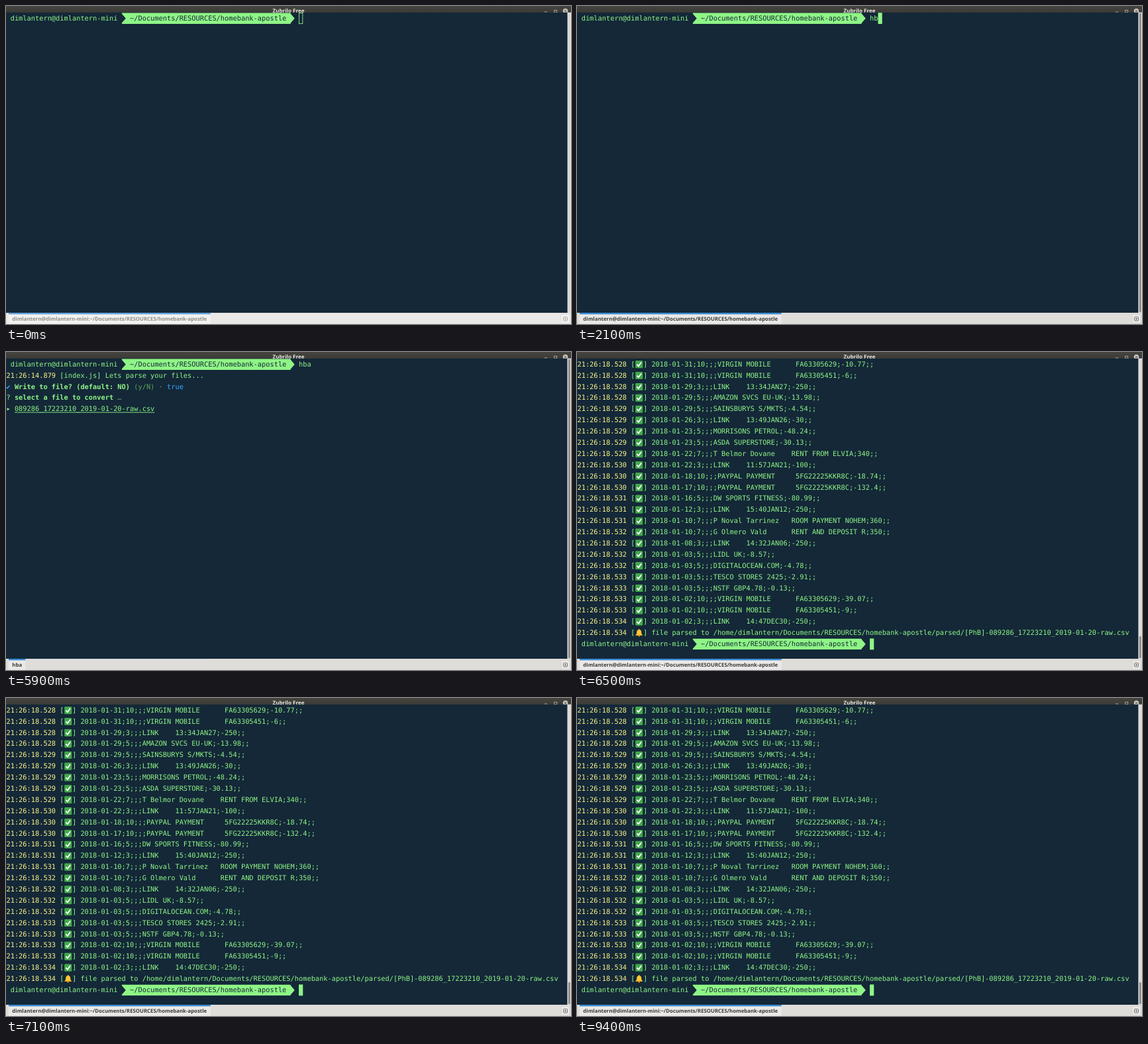
An HTML page that plays this animation: 853x480 px, repeating every 9500 ms.

```html
<!DOCTYPE html>
<html lang="en">
<head>
<meta charset="utf-8">
<title>Terminal session</title>
<style>
html, body { margin: 0; width: 100%; height: 100%; overflow: hidden; background: #142838; }
#stage {
  position: absolute; left: 0; top: 0; width: 1920px; height: 1080px; overflow: hidden;
  transform: scale(.44427, .444445); transform-origin: 0 0;
  text-rendering: geometricPrecision;
}
#stage div { position: absolute; box-sizing: border-box; }

.title {
  left: 0; top: 0; width: 1920px; height: 40px;
  background: linear-gradient(#45443f, #3b3a36 24px);
  font: bold 18px/24px "Open Sans", "Noto Sans", sans-serif; color: #efece6; text-align: center;
}
.title span { position: absolute; left: 0; right: 0; top: 5px; }
.title svg { position: absolute; left: 1820px; top: 0; }

.term { left: 0; top: 22px; width: 1908px; height: 1020px; background: #142838; overflow: hidden; }
.screen { left: 1px; top: 1px; width: 1906px; height: 1018px; visibility: hidden; }
#stage .row {
  position: relative; height: 38px; line-height: 38px; white-space: pre; color: #8ff586;
  font-family: "DejaVu Sans Mono", "Liberation Mono", monospace; font-size: 23.25px;
}
.time { color: #fff688; }
.dim { color: #5fa359; }
.blue { color: #3ba5ff; }
.path { color: #142838; }
b { font-weight: bold; }
u { text-decoration-thickness: 2px; text-underline-offset: 3px; }
.cell { display: inline-block; width: 14px; }
.icon { display: inline-block; width: 28px; height: 38px; vertical-align: top; }
.ribbon { position: absolute; left: 392px; top: 0; }
.cursor { width: 14px; height: 38px; background: #8ff586; }
.cursor.hollow { background: none; border: 2px solid #8ff586; }

.chrome { left: 0; top: 0; width: 1920px; height: 1080px; }
.bar { left: 0; top: 1042px; width: 1920px; height: 38px; background: #ebe9e7; }
.tab {
  left: 9px; top: 0; height: 38px; padding: 8px 12px 0; border-top: 5px solid #5ba0dd;
  background: #f3f2f1; color: #8d8c8a; white-space: pre;
  font: bold 17.6px/24px "Open Sans", "Noto Sans", sans-serif;
}
.tab span { position: relative; top: -5px; }
.more { left: 1886px; top: 5px; width: 30px; height: 31px; border: 1px solid #d2d0cd; border-radius: 4px; background: #f3f2f1; color: #979593; }
.more svg { position: absolute; left: 6px; top: 6px; }
.rail { left: 1908px; top: 22px; width: 12px; height: 1020px; background: #ecebe9; }
.thumb { left: 3px; top: 2px; width: 6px; height: 1016px; border-radius: 3px; background: #d3d1cf; }
.front .bar { background: #dfddda; }
.front .tab { border-top-color: #2f86d6; background: #ebe9e7; color: #3a3a38; }
.front .more { background: #eceae8; border-color: #bfbdb9; color: #4d4c49; }
.front .rail { background: #dedcd9; }
.front .thumb { background: #8b8987; }
</style>
</head>
<body>
<div id="stage">
  <div class="title">
    <span>Zubrilo Free</span>
    <svg width="100" height="40" fill="none" stroke="#bdbab2" stroke-width="2">
      <path d="M10 20h9M43 14h9v8h-9z"/>
      <circle cx="81" cy="17" r="8.5" fill="#c9c6bf" stroke="none"/>
      <path d="M77.500 13.500l7 7m0-7l-7 7" stroke="#3b3a36"/>
    </svg>
  </div>
  <div class="term" id="term"></div>
</div>
<script>
const LOOP = 9500;
const USER = 'dimlantern', HOST = USER + '-mini';
const DIR = '~/Documents/RESOURCES/homebank-apostle';
const FILE = '089286_17223210_2019-01-20-raw.csv';
const LONG_TAB = `${USER}@${HOST}:${DIR}`;

const stage = document.getElementById('stage');
const term = document.getElementById('term');

const span = (cls, text) => `<span class="${cls}">${text}</span>`;
const cell = (ch, cls = '') => span('cell ' + cls, ch);
const icon = shapes => `<svg class="icon" viewBox="0 0 28 38">${shapes}</svg>`;

const CHECK = icon('<rect x="1.500" y="6.500" width="25" height="25" rx="3" fill="#43a94c"/>' +
  '<path d="M6.500 19l5.500 6 9.500-13" fill="none" stroke="#fff" stroke-width="4"/>');
const BELL = icon('<path d="M14 6c1.500 0 2 1 2 2 5 1.500 6 6 6 10 0 5 2 6 4 9H2c2-3 4-4 4-9 0-4 1-8.500 6-10 0-1 .5-2 2-2z" fill="#ffc52f"/>' +
  '<path d="M2 26h24v2H2z" fill="#e9a01f"/><circle cx="14" cy="29" r="3" fill="#d98d1c"/>');

// Green path segment with a notch on the left and a point on the right.
const RIBBON = '<svg class="ribbon" width="588" height="38" fill="#8ff586">' +
  '<path d="M0 0H574V3L588 19 574 35V38H0V35L14 19 0 3z"/></svg>';

const prompt = (cmd = '') =>
  RIBBON + ` ${USER}@${HOST}   ` + `<span class="path" style="position:relative">${DIR}</span>   ${cmd}`;

const greeting = span('time', '21:26:14.879') + ' [index.js] Lets parse your files...';
const question = (mark, sep, answer) =>
  `${mark} <b>Write to file? (default: NO)</b> ${span('dim', '(y/N)')} ${cell(sep, 'dim')} ${answer}`;

const asking = [prompt('hba'), greeting, question('?', '‣', 'false')];
const picking = [
  prompt('hba'), greeting,
  question(cell('✔', 'blue'), '·', span('blue', 'true')),
  `? <b>select a file to convert</b> ${cell('…', 'dim')}`,
  `${cell('▸')} <u>${FILE}</u>`
];

// Each entry: millisecond stamp, then the parsed record.
const records = `
528 2018-01-31;10;;;VIRGIN MOBILE      FA63305629;-10.77;;
528 2018-01-31;10;;;VIRGIN MOBILE      FA63305451;-6;;
528 2018-01-29;3;;;LINK    13:34JAN27;-250;;
528 2018-01-29;5;;;AMAZON SVCS EU-UK;-13.98;;
529 2018-01-29;5;;;SAINSBURYS S/MKTS;-4.54;;
529 2018-01-26;3;;;LINK    13:49JAN26;-30;;
529 2018-01-23;5;;;MORRISONS PETROL;-48.24;;
529 2018-01-23;5;;;ASDA SUPERSTORE;-30.13;;
529 2018-01-22;7;;;T Belmor Dovane    RENT FROM ELVIA;340;;
530 2018-01-22;3;;;LINK    11:57JAN21;-100;;
530 2018-01-18;10;;;PAYPAL PAYMENT     5FG22225KKR8C;-18.74;;
530 2018-01-17;10;;;PAYPAL PAYMENT     5FG22225KKR8C;-132.4;;
531 2018-01-16;5;;;DW SPORTS FITNESS;-80.99;;
531 2018-01-12;3;;;LINK    15:40JAN12;-250;;
531 2018-01-10;7;;;P Noval Tarrinez   ROOM PAYMENT NOHEM;360;;
532 2018-01-10;7;;;G Olmero Vald      RENT AND DEPOSIT R;350;;
532 2018-01-08;3;;;LINK    14:32JAN06;-250;;
532 2018-01-03;5;;;LIDL UK;-8.57;;
532 2018-01-03;5;;;DIGITALOCEAN.COM;-4.78;;
533 2018-01-03;5;;;TESCO STORES 2425;-2.91;;
533 2018-01-03;5;;;NSTF GBP4.78;-0.13;;
533 2018-01-02;10;;;VIRGIN MOBILE      FA63305629;-39.07;;
533 2018-01-02;10;;;VIRGIN MOBILE      FA63305451;-9;;
534 2018-01-02;3;;;LINK    14:47DEC30;-250;;`.trim().split('\n');

const logLine = (ms, mark, text) => `${span('time', '21:26:18.' + ms)} [${mark}] ${text}`;
const parsed = [
  ...records.map(r => logLine(r.slice(0, 3), CHECK, r.slice(4))),
  logLine(534, BELL, `file parsed to /home/${USER}/Documents/RESOURCES/homebank-apostle/parsed/[PhB]-${FILE}`),
  prompt()
];

// cursor: [column, row]
const steps = [
  { at: 0, rows: [prompt()], cursor: [71, 0], hollow: true },
  { at: 100, rows: [prompt()], cursor: [71, 0] },
  { at: 1800, rows: [prompt('h')], cursor: [72, 0] },
  { at: 2000, rows: [prompt('hb')], cursor: [73, 0] },
  { at: 2300, rows: [prompt('hba')], cursor: [74, 0] },
  { at: 2800, rows: [prompt('hba')], cursor: [0, 1], tab: 'hba' },
  { at: 3100, rows: asking, tab: 'hba' },
  { at: 4600, rows: picking, tab: 'hba' },
  { at: 6500, rows: parsed, cursor: [71, 25], scrolled: true }
];

function add(parent, cls, html = '') {
  const el = document.createElement('div');
  el.className = cls;
  el.innerHTML = html;
  parent.appendChild(el);
  return el;
}

function addChrome(cls) {
  const el = add(stage, 'chrome ' + cls,
    `<div class="rail"><div class="thumb"></div></div>
     <div class="bar"><div class="tab"><span>${LONG_TAB}</span></div><div class="more">
     <svg width="16" height="17" fill="none" stroke="currentColor" stroke-width="1.800">
     <rect x="1.500" y="2" width="13" height="13" rx="2"/><path d="M8 5.500v6M5 8.500h6"/></svg></div></div>`);
  return { el, label: el.querySelector('.tab span'), thumb: el.querySelector('.thumb') };
}

for (const s of steps) {
  s.el = add(term, 'screen', s.rows.map(r => `<div class="row">${r}</div>`).join(''));
  if (s.cursor) {
    const c = add(s.el, s.hollow ? 'cursor hollow' : 'cursor');
    c.style.left = s.cursor[0] * 14 + 'px';
    c.style.top = s.cursor[1] * 38 + 'px';
  }
}
addChrome('back');
const front = addChrome('front');

let shown = null;
function show(step) {
  if (step === shown) return;
  if (shown) shown.el.style.visibility = 'hidden';
  step.el.style.visibility = 'visible';
  front.label.textContent = step.tab || LONG_TAB;
  front.thumb.style.top = step.scrolled ? '943px' : '2px';
  front.thumb.style.height = step.scrolled ? '75px' : '1016px';
  shown = step;
}

const start = performance.now();
function draw() {
  const t = (performance.now() - start) % LOOP;
  show(steps.filter(s => s.at <= t).pop());
  // The window gains focus with a short fade.
  front.el.style.opacity = Math.min(1, Math.max(0, (t - 100) / 200));
  requestAnimationFrame(draw);
}
draw();
</script>
</body>
</html>
```
